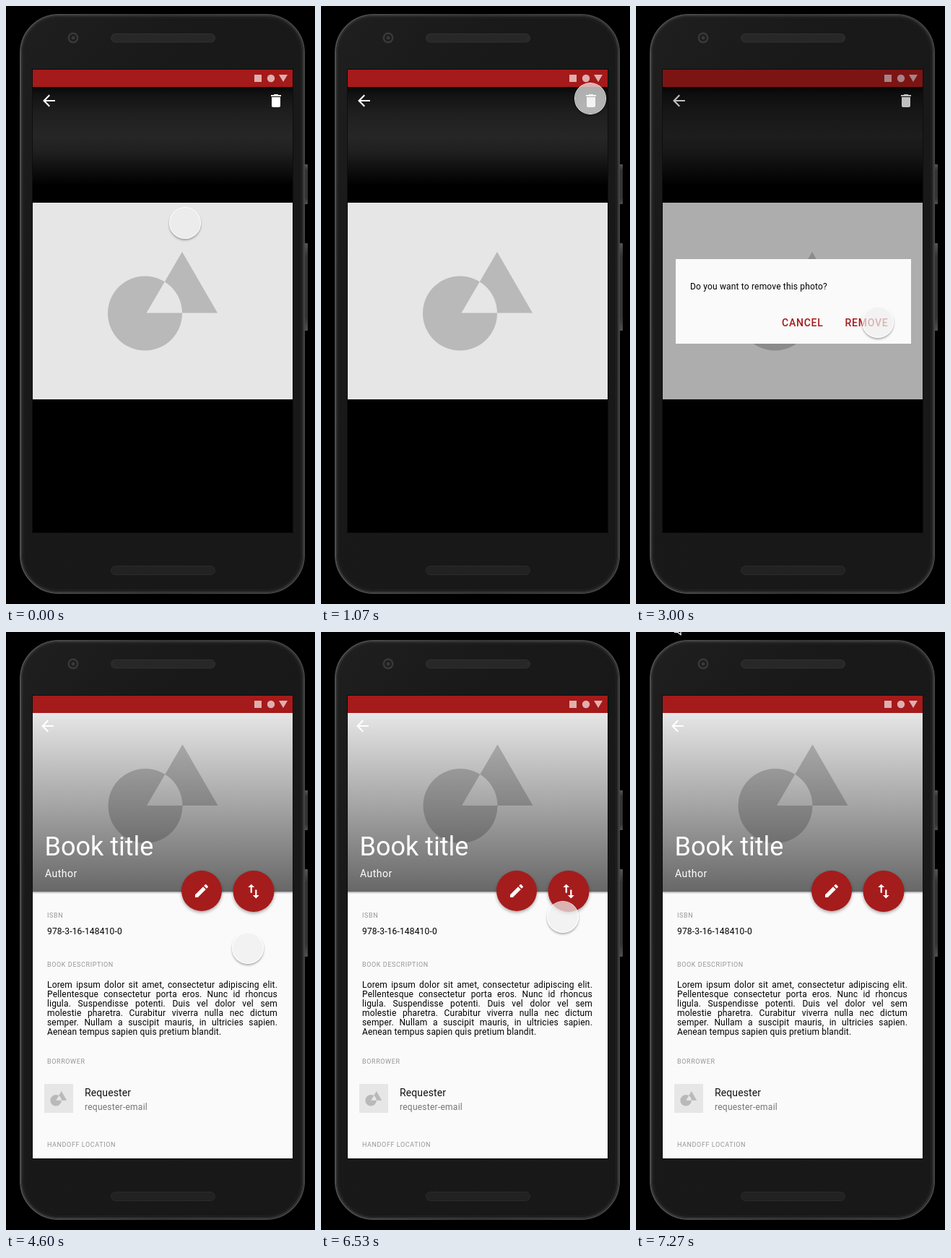
An HTML page for the animation above (8000 ms loop, 428 px wide and 827 px high).

```html
<!DOCTYPE html>
<html lang="en">
<head>
<meta charset="utf-8">
<title>Remove photo</title>
<style>
  html, body { margin: 0; width: 100%; height: 100%; overflow: hidden; background: #000; }
  svg { position: absolute; left: 0; top: 0; }
  svg, .description { font-family: Roboto, sans-serif; }
  .label { font-size: 9px; letter-spacing: .6px; fill: #959595; }
  .body { font-size: 12px; letter-spacing: .17px; fill: #000; }
  .button { font-size: 14px; font-weight: 500; letter-spacing: .75px; fill: #a51919; }
  .description { font-size: 12px; line-height: 13px; letter-spacing: .17px; color: #000; }
  .description div { white-space: nowrap; text-align: justify; text-align-last: justify; }
  .description div:last-child { text-align-last: left; }
  #touch {
    position: absolute; left: -22px; top: -22px; width: 44px; height: 44px;
    box-sizing: border-box; border: 1px solid rgba(255, 255, 255, .92); border-radius: 50%;
    background: rgba(239, 239, 239, .72); background-clip: padding-box;
    box-shadow: 0 2px 3px rgba(0, 0, 0, .32);
  }
</style>
</head>
<body>
<svg width="428" height="827" viewBox="0 0 428 827">
  <defs>
    <linearGradient id="shell" x1="0" y1="0" x2=".7" y2="1">
      <stop offset="0" stop-color="#1f1f1f"/><stop offset=".3" stop-color="#191919"/><stop offset="1" stop-color="#181818"/>
    </linearGradient>
    <linearGradient id="rim">
      <stop offset="0" stop-color="#4e4e4e"/><stop offset=".5" stop-color="#363636"/><stop offset="1" stop-color="#444"/>
    </linearGradient>
    <linearGradient id="key" x1="0" y1="0" x2="0" y2="1">
      <stop offset="0" stop-color="#555"/><stop offset=".15" stop-color="#333"/><stop offset=".85" stop-color="#333"/><stop offset="1" stop-color="#505050"/>
    </linearGradient>
    <linearGradient id="toolbar" x1="0" y1="0" x2="0" y2="1">
      <stop offset="0" stop-color="#080808"/><stop offset=".08" stop-color="#131313"/><stop offset=".27" stop-color="#1f1f1f"/>
      <stop offset=".5" stop-color="#262626"/><stop offset=".65" stop-color="#202020"/><stop offset=".97" stop-color="#030303"/><stop offset="1" stop-color="#000"/>
    </linearGradient>
    <linearGradient id="scrim" x1="0" y1="0" x2="0" y2="1">
      <stop offset="0" stop-opacity="0"/><stop offset="1" stop-opacity=".55"/>
    </linearGradient>
    <pattern id="mesh" width="4" height="4" patternUnits="userSpaceOnUse">
      <rect width="1" height="1" fill="#1c1c1c"/><rect x="2" y="2" width="1" height="1" fill="#1c1c1c"/>
    </pattern>
    <filter id="lift" x="-30%" y="-30%" width="160%" height="160%">
      <feDropShadow dx="0" dy="2" stdDeviation="2" flood-opacity=".35"/>
    </filter>
    <clipPath id="hero"><rect x="37" y="112" width="360" height="247"/></clipPath>
    <path id="shapes" fill="#b9b9b9" fill-rule="evenodd"
      d="M141 425a51.5 51.5 0 1 0 103 0a51.5 51.5 0 1 0-103 0zM244 340L293 424.5H194.5z"/>
    <path id="back" fill="#fff" d="M20 11H7.83l5.59-5.59L12 4l-8 8 8 8 1.41-1.41L7.83 13H20z"/>
  </defs>

  <g id="phone">
    <rect x="413" y="219" width="5" height="55" rx="1" fill="url(#key)"/>
    <rect x="413" y="328" width="5" height="121" rx="1" fill="url(#key)"/>
    <rect x="20" y="12" width="393" height="800" rx="53" fill="url(#shell)" stroke="url(#rim)" stroke-width="2"/>
    <rect x="22" y="14" width="389" height="796" rx="51" fill="none" stroke="#2d2d2d" stroke-width="2"/>
    <rect x="24.5" y="16.5" width="384" height="791" rx="49" fill="none" stroke="#222"/>
    <circle cx="93" cy="44" r="7.5" fill="#393939"/>
    <circle cx="93" cy="44" r="5" fill="#1d1d1d"/>
    <circle cx="93" cy="44" r="2.5" fill="#393939"/>
    <g fill="#292929" stroke="#303030">
      <rect x="145.5" y="38.5" width="144" height="11.5" rx="5.7"/>
      <rect x="145.5" y="774.5" width="144" height="12" rx="6" fill="#222" stroke="#2b2b2b"/>
    </g>
    <rect x="150" y="40" width="135" height="9" fill="url(#mesh)"/>
    <rect x="36" y="87" width="362" height="642" fill="#0d0d0d"/>
  </g>

  <rect x="37" y="88" width="360" height="640" fill="#000"/>

  <g id="photo">
    <rect x="37" y="112" width="360" height="136" fill="url(#toolbar)"/>
    <use href="#back" transform="translate(46.9 118.4) scale(1.05)"/>
    <path fill="#fff" transform="translate(362 119)"
      d="M6 19c0 1.1.9 2 2 2h8c1.1 0 2-.9 2-2V7H6zM19 4h-3.5l-1-1h-5l-1 1H5v2h14z"/>
    <rect x="37" y="272" width="360" height="272" fill="#e6e6e6"/>
    <use href="#shapes"/>
  </g>

  <g id="details">
    <rect x="37" y="112" width="360" height="616" fill="#fafafa"/>
    <g clip-path="url(#hero)">
      <rect x="37" y="112" width="360" height="247" fill="#e6e6e6"/>
      <use href="#shapes" x=".5" y="-184.5"/>
      <rect x="37" y="112" width="360" height="247" fill="url(#scrim)"/>
    </g>
    <path d="M37 359.5h360" stroke="#000" stroke-opacity=".3"/>
    <path d="M37 360.5h360" stroke="#000" stroke-opacity=".16"/>
    <path d="M37 361.5h360" stroke="#000" stroke-opacity=".07"/>
    <use href="#back" transform="translate(44.9 117.4) scale(1.05)"/>
    <g fill="#fff">
      <text x="53.5" y="309" font-size="36">Book title</text>
      <text x="54" y="339" font-size="14" letter-spacing=".5">Author</text>
    </g>
    <g fill="#a51a1a" filter="url(#lift)">
      <circle cx="271" cy="358" r="28"/>
      <circle cx="343" cy="358.5" r="28.5"/>
    </g>
    <g fill="#fff">
      <path transform="translate(259 346)" d="M3 17.25V21h3.75L17.81 9.94l-3.75-3.75zM20.71 7.04c.39-.39.39-1.02 0-1.41l-2.34-2.34c-.39-.39-1.02-.39-1.41 0l-1.83 1.83 3.75 3.75z"/>
      <path transform="translate(329.8 345.4) scale(1.1)" d="M16 17.01V10h-2v7.01h-3L15 21l4-3.99zM9 3L5 6.99h3V14h2V6.99h3z"/>
    </g>
    <g class="label">
      <text x="57" y="395">ISBN</text>
      <text x="57" y="463">BOOK DESCRIPTION</text>
      <text x="57" y="597">BORROWER</text>
      <text x="57" y="712">HANDOFF LOCATION</text>
    </g>
    <text class="body" x="57" y="418">978-3-16-148410-0</text>
    <foreignObject x="57" y="482" width="319" height="80">
      <div xmlns="http://www.w3.org/1999/xhtml" class="description">
        <div>Lorem ipsum dolor sit amet, consectetur adipiscing elit.</div>
        <div>Pellentesque consectetur porta eros. Nunc id rhoncus</div>
        <div>ligula. Suspendisse potenti. Duis vel dolor vel sem</div>
        <div>molestie pharetra. Curabitur viverra nulla nec dictum</div>
        <div>semper. Nullam a suscipit mauris, in ultricies sapien.</div>
        <div>Aenean tempus sapien quis pretium blandit.</div>
      </div>
    </foreignObject>
    <rect x="53" y="625" width="40" height="40" fill="#e6e6e6"/>
    <use href="#shapes" transform="translate(40.2 584) scale(.15)"/>
    <text x="109" y="642" font-size="14" letter-spacing=".1" fill="#111">Requester</text>
    <text x="109" y="661" font-size="12" letter-spacing=".25" fill="#757575">requester-email</text>
  </g>

  <g id="status">
    <rect x="37" y="88" width="360" height="24" fill="#a51a1a"/>
    <g fill="#fff" fill-opacity=".65">
      <rect x="344" y="95" width="10" height="10"/>
      <circle cx="367" cy="100" r="5.2"/>
      <path d="M378 95h12l-6 10z"/>
    </g>
  </g>

  <rect id="dim" x="37" y="88" width="360" height="640" fill-opacity=".25"/>

  <g id="dialog">
    <rect x="55" y="350" width="326" height="117" fill="#fafafa"/>
    <text class="body" x="75" y="392">Do you want to remove this photo?</text>
    <text class="button" x="202" y="443">CANCEL</text>
    <text class="button" x="289.5" y="443">REMOVE</text>
  </g>

  <path id="spinner" d="M217 388A20 20 0 1 1 197 408" fill="none" stroke="#c81c1c" stroke-width="4"/>
  <path id="pointer" d="M53 .3h4.5l4.5 3.4V0" fill="none" stroke="#fff" stroke-width="1.2"/>
</svg>
<div id="touch"></div>

<script>
const LOOP = 8000;
const STEP = 1000 / 15;
const get = id => document.getElementById(id);
const show = (id, on) => { get(id).style.display = on ? "" : "none"; };
const mix = (a, b, p) => a + (b - a) * p;
const progress = (t, from, to) => Math.min(1, Math.max(0, (t - from) / (to - from)));
const cubic = p => p < .5 ? 4 * p ** 3 : 1 - 4 * (1 - p) ** 3;
const smooth = p => p * p * (3 - 2 * p);

function touchAt(t) {
  if (t < 2990) {
    // The horizontal travel settles one step before the vertical one.
    return [mix(248, 373, cubic(progress(t, 66, 1000))), mix(300, 128, cubic(progress(t, 66, 1066)))];
  }
  if (t < 6530) return [335, 437];
  if (t < 7060) {
    const p = smooth(progress(t, 6600, 6933));
    return [mix(335, 84, p), mix(394, 5, p)];
  }
  return [82, -9];
}

function render(ms) {
  // The motion runs at fifteen steps per second.
  const t = Math.floor((ms + 4) / STEP) * STEP + .01;
  const details = t >= 4600;
  show("photo", !details);
  show("details", details);
  show("dim", t >= 3000 && !details);
  show("dialog", t >= 3000 && t < 3400);
  show("spinner", t >= 3400 && !details);
  show("pointer", t >= 7130);
  get("pointer").setAttribute("transform", `translate(${t < 7260 ? 1 : 0} 0)`);
  show("touch", t < 7130);
  const [x, y] = touchAt(t);
  get("touch").style.transform = `translate(${x}px, ${y}px)`;
}

const start = performance.now();
function tick() {
  render((performance.now() - start) % LOOP);
  requestAnimationFrame(tick);
}
tick();
</script>
</body>
</html>
```
